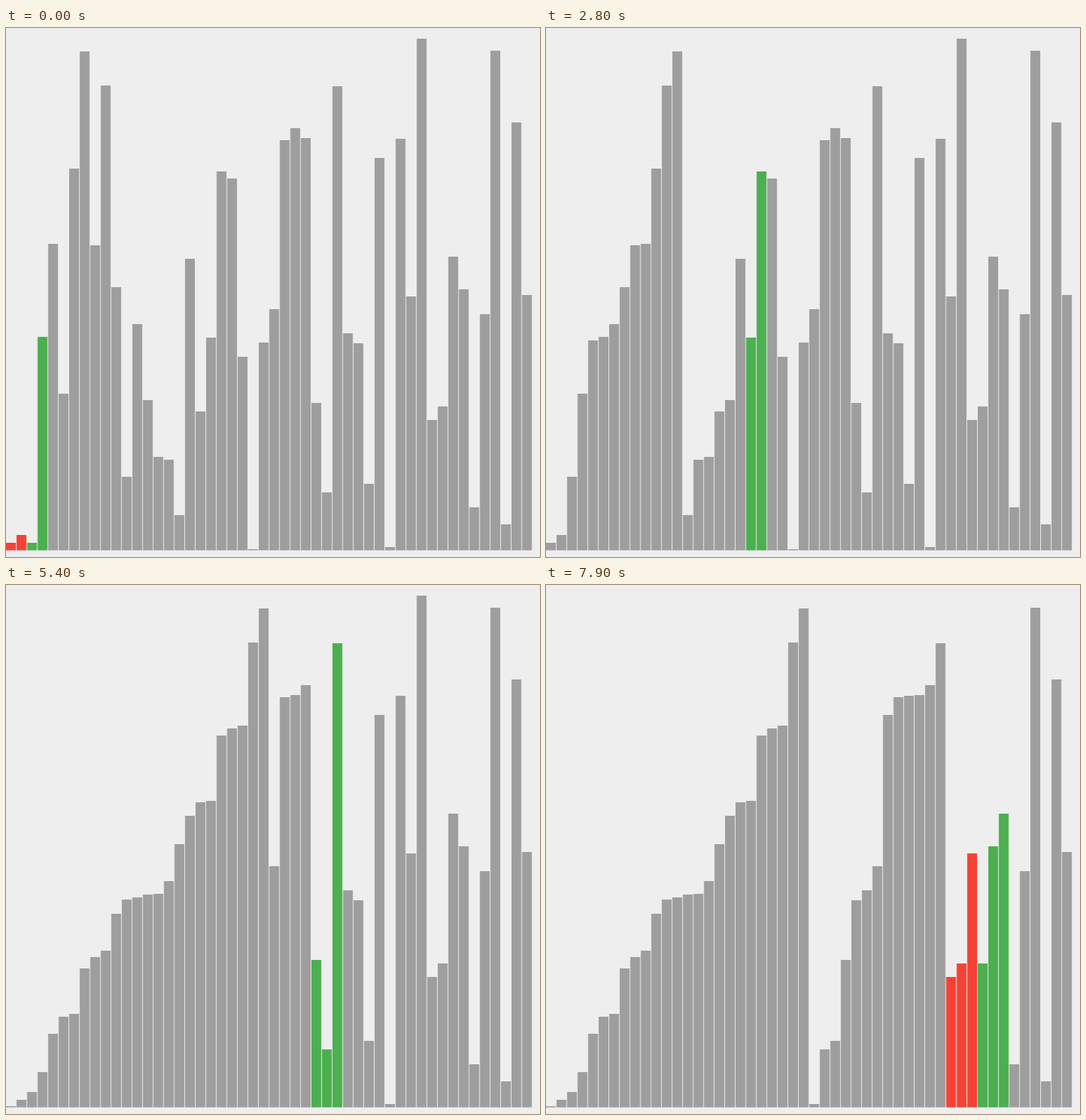
An HTML page with a canvas for the animation above (8000 ms loop, 752 by 745 pixels).

```html
<!DOCTYPE html>
<html lang="en">
<head>
<meta charset="utf-8">
<title>Merge sort</title>
<style>
  html, body { margin: 0; width: 100%; height: 100%; overflow: hidden; background: #eee; }
  canvas { display: block; }
</style>
</head>
<body>
<canvas id="stage" width="752" height="745"></canvas>
<script>
const canvas = document.getElementById('stage');
const ctx = canvas.getContext('2d');
const GRAY = '#9e9e9e', RED = '#f44336', GREEN = '#4caf50';
const LOOP = 8000, TICK = 100;
const BASE = 735.6, PITCH = 14.83;
const BAR = PITCH * 14 / 15; // 14 parts bar, 1 part gap

// The unsorted input: top edge of each bar.
const tops = [
  714, 440, 725, 435, 304, 515, 198, 33, 306, 81,
  365, 632, 417, 524, 604, 608, 686, 325, 540, 436,
  202, 212, 463, 734, 443, 396, 158, 141, 155, 528,
  654, 82, 430, 444, 642, 183, 731, 156, 378, 15,
  552, 533, 322, 368, 675, 403, 32, 699, 133, 376
];

// Yields on entering a range and after every write; done is the end of the merged part.
function* mergeSort(bars, lo, hi) {
  if (lo >= hi) return;
  yield { bars: [...bars], lo, hi, done: lo };
  const mid = (lo + hi) >> 1;
  yield* mergeSort(bars, lo, mid);
  yield* mergeSort(bars, mid + 1, hi);
  const left = bars.slice(lo, mid + 1);
  const right = bars.slice(mid + 1, hi + 1);
  for (let k = lo; k <= hi; k++) {
    const fromLeft = !right.length || left[0] >= right[0];
    bars[k] = (fromLeft ? left : right).shift();
    yield { bars: [...bars], lo, hi, done: k + 1 };
  }
}

const steps = [...mergeSort(tops, 0, tops.length - 1)];
const FIRST = 12.4, STEPS_PER_TICK = 2.678;

function draw({ bars, lo, hi, done }) {
  ctx.fillStyle = '#eee';
  ctx.fillRect(0, 0, canvas.width, canvas.height);
  bars.forEach((top, i) => {
    const active = i >= lo && i <= hi;
    ctx.fillStyle = !active ? GRAY : i < done ? RED : GREEN;
    ctx.fillRect(i * PITCH, top, BAR, BASE - top);
  });
}

const start = performance.now();

function frame() {
  const tick = Math.floor((performance.now() - start) % LOOP / TICK);
  draw(steps[Math.floor(FIRST + tick * STEPS_PER_TICK)]);
  requestAnimationFrame(frame);
}

frame();
</script>
</body>
</html>
```
